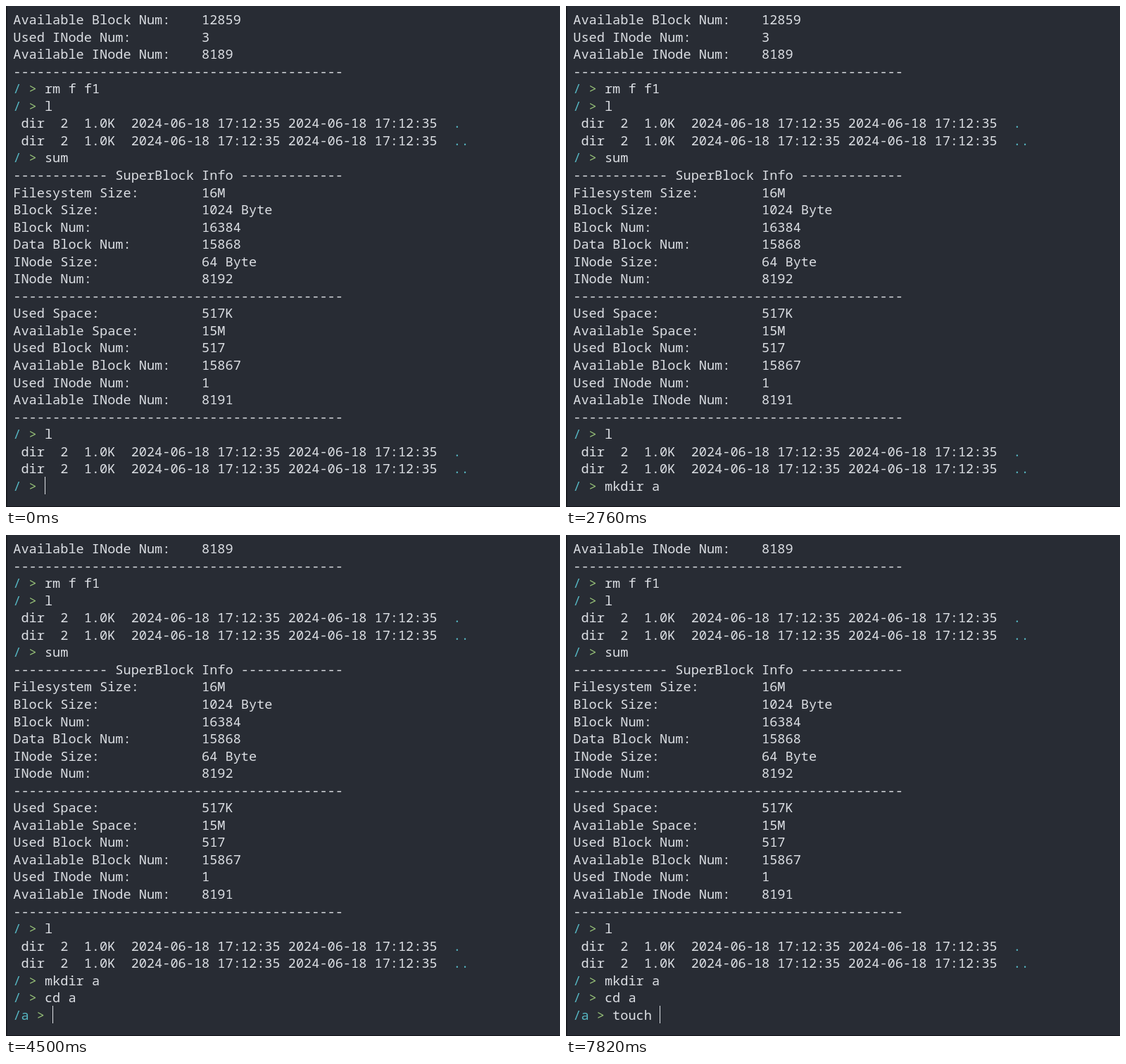
An HTML page with a canvas that plays this animation: 787 px wide and 712 px high, repeating every 8000 ms.

```html
<!DOCTYPE html>
<html lang="en">
<head>
<meta charset="utf-8">
<title>Terminal session</title>
<style>
  html, body { margin: 0; width: 100%; height: 100%; overflow: hidden; background: #282c34; }
  canvas { display: block; }
</style>
</head>
<body>
<canvas id="stage" width="787" height="712"></canvas>
<script>
const ctx = document.getElementById('stage').getContext('2d');
const LOOP = 8000, ROWS = 28;
const LEFT = 10.3, CHAR_WIDTH = 11.16, LINE_HEIGHT = 24.55, FIRST_BASELINE = 26;
const BACK = '#282c34', TEXT = '#dcdfe4', CYAN = '#56b6c2', GREEN = '#98c379';

const rule = '-'.repeat(42);
const field = (name, value) => (name + ':').padEnd(24) + value;
const stamp = '2024-06-18 17:12:35';
const listing = ['.', '..'].map(name => ` dir  2  1.0K  ${stamp} ${stamp}  ${name}`);

const history = [
  field('Available Block Num', 12859),
  field('Used INode Num', 3),
  field('Available INode Num', 8189),
  rule,
  '/ > rm f f1',
  '/ > l',
  ...listing,
  '/ > sum',
  '------------ SuperBlock Info -------------',
  field('Filesystem Size', '16M'),
  field('Block Size', '1024 Byte'),
  field('Block Num', 16384),
  field('Data Block Num', 15868),
  field('INode Size', '64 Byte'),
  field('INode Num', 8192),
  rule,
  field('Used Space', '517K'),
  field('Available Space', '15M'),
  field('Used Block Num', 517),
  field('Available Block Num', 15867),
  field('Used INode Num', 1),
  field('Available INode Num', 8191),
  rule,
  '/ > l',
  ...listing
];

// Each prompt holds [time, typed text, caret hidden] states.
const prompts = [
  { start: 0, label: '/ > ', states: [
    [0, ''], [820, 'mk'], [990, 'mkd'], [1140, 'mkdi'], [1220, 'mkdir'],
    [1680, 'mkdir '], [2080, 'mkdir a'], [2760, 'mkdir a', true]] },
  { start: 3240, label: '/ > ', states: [
    [3240, ''], [3770, 'c'], [3880, 'cd'], [3990, 'cd '], [4100, 'cd a']] },
  { start: 4500, label: '/a > ', states: [
    [4500, ''], [5090, '', true], [5690, ''], [6040, 't'], [6100, 'to'], [6170, 'tou'],
    [6770, 'tou', true], [6840, 'touh'], [7300, 'tou'], [7400, 'touc'],
    [7490, 'touch'], [7820, 'touch ']] }
];

// Mouse pointer positions; a missing position hides it.
const pointer = [
  [0], [70, 687, 618], [150, 660, 584], [220, 634, 552], [290, 620, 535],
  [360, 633, 547], [820], [1450, 633, 547], [1680]
];

const latest = (states, t) => states.filter(state => state[0] <= t).pop();
const columnX = column => LEFT + column * CHAR_WIDTH;

function write(text, column, row, color) {
  ctx.fillStyle = color;
  ctx.fillText(text, columnX(column), Math.round(FIRST_BASELINE + row * LINE_HEIGHT));
}

function drawLine(line, row) {
  const prompt = line.match(/^(\/\w*) > /);
  if (prompt) {
    const [lead, path] = prompt;
    write(path, 0, row, CYAN);
    write('>', path.length + 1, row, GREEN);
    write(line.slice(lead.length), lead.length, row, TEXT);
  } else if (line.startsWith(' dir')) {
    write(line.slice(0, 56), 0, row, TEXT);
    write(line.slice(56), 56, row, CYAN);
  } else {
    write(line, 0, row, TEXT);
  }
}

function drawPointer(x, y) {
  ctx.save();
  ctx.translate(x + 0.5, y + 0.5);
  const arrow = new Path2D('M0 0V17L4 13.3L6.8 20L9.6 18.8L6.9 12.3H12Z');
  ctx.fillStyle = '#fff';
  ctx.strokeStyle = '#000';
  ctx.fill(arrow);
  ctx.stroke(arrow);
  ctx.restore();
}

function draw(t) {
  ctx.fillStyle = BACK;
  ctx.fillRect(0, 0, 787, 712);
  ctx.fillStyle = '#14161a';
  ctx.fillRect(0, 0, 1.5, 712);
  ctx.fillRect(0, 711, 787, 1);

  ctx.font = '18.6px "Noto Sans Mono", monospace';
  const shown = prompts.filter(prompt => prompt.start <= t);
  const lines = shown.map(({ label, states }) => label + latest(states, t)[1]);
  [...history, ...lines].slice(-ROWS).forEach(drawLine);

  const caretHidden = latest(shown.at(-1).states, t)[2];
  if (!caretHidden) {
    ctx.fillStyle = TEXT;
    ctx.fillRect(Math.round(columnX(lines.at(-1).length)), 669, 1, 25);
  }

  const [, x, y] = latest(pointer, t);
  if (x !== undefined) drawPointer(x, y);
}

const begin = performance.now();
function tick() {
  draw((performance.now() - begin) % LOOP);
  requestAnimationFrame(tick);
}
tick();
</script>
</body>
</html>
```
